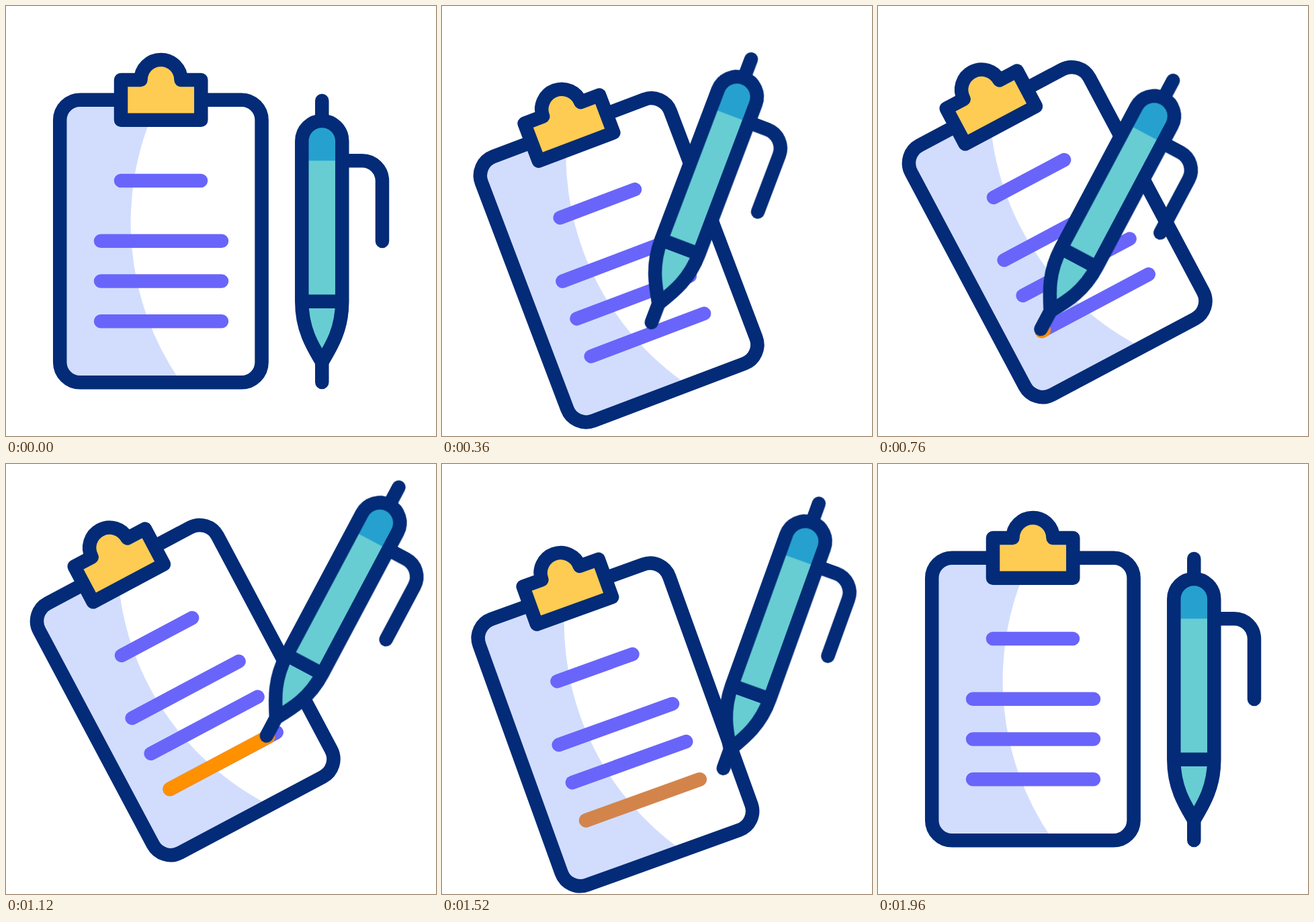
Recreate the animation shown at these times as an HTML page without scripts. Size 640x640 px, loop 2000 ms.

```html
<!DOCTYPE html>
<html lang="en">
<head>
<meta charset="utf-8">
<title>Clipboard and pen</title>
<style>
  html, body { margin: 0; width: 100%; height: 100%; overflow: hidden; background: #fff; }
  svg { display: block; width: 100%; height: 100%; }

  .ink { fill: none; stroke: #032b77; stroke-width: 20.5; stroke-linecap: round; stroke-linejoin: round; }
  .text { fill: none; stroke: #6965fa; stroke-width: 20.5; stroke-linecap: round; }
  .mark { fill: none; stroke: #ff9100; stroke-width: 21; stroke-linecap: round; stroke-dasharray: 180 400; }

  .board, .pen, .mark {
    animation-duration: 2s;
    animation-iteration-count: infinite;
    animation-timing-function: cubic-bezier(.5, 0, .5, 1);
  }
  .board { transform-origin: 230.5px 350px; animation-name: board-turn, board-move; }
  .pen { transform-origin: 470.5px 230px; animation-name: pen-turn, pen-move; }
  .mark { animation-name: write, fade; }

  @keyframes board-turn {
    0%, 2%, 98%, 100% { rotate: 0deg; }
    27.5%, 62% { rotate: -28deg; }
  }
  @keyframes pen-turn {
    0%, 2%, 98%, 100% { rotate: 0deg; }
    27.5%, 62% { rotate: 28deg; }
  }

  /* dips in an arc on the way in and on the way back */
  @keyframes board-move {
    0%, 98%, 100% { translate: 0 0; }
    2% { translate: 0 0; animation-timing-function: cubic-bezier(.5, 0, .8, .66); }
    10% { translate: 10px 31px; animation-timing-function: linear; }
    13.5% { translate: 19px 39.5px; animation-timing-function: linear; }
    16% { translate: 27px 38.5px; animation-timing-function: linear; }
    18% { translate: 32.7px 28.5px; animation-timing-function: cubic-bezier(.25, .33, .5, 1); }
    27.5% { translate: 36.3px -13.5px; }
    62% { translate: 36.3px -13.5px; animation-timing-function: cubic-bezier(.5, 0, .8, .66); }
    74% { translate: 32.8px 27.5px; animation-timing-function: linear; }
    76% { translate: 27.7px 37.9px; animation-timing-function: cubic-bezier(.3, .5, .65, .9); }
    80% { translate: 19px 39px; animation-timing-function: cubic-bezier(.4, .2, .7, .6); }
    84% { translate: 9.2px 30.6px; animation-timing-function: cubic-bezier(.2, .33, .5, 1); }
  }

  @keyframes pen-move {
    0%, 98%, 100% { translate: 0 0; }
    2% { translate: 0 0; animation-timing-function: cubic-bezier(.5, 0, .65, .9); }
    14% { translate: -31px -75px; animation-timing-function: cubic-bezier(.4, .3, .7, .6); }
    18% { translate: -41.5px -67.7px; animation-timing-function: cubic-bezier(.33, .4, .6, 1); }
    30% { translate: -79px -35px; animation-timing-function: ease-in-out; }
    35% { translate: -76px -38.8px; }
    62% { translate: 85.3px -123.5px; }
  }

  @keyframes write {
    0%, 35% { stroke-dashoffset: 180; }
    62%, 100% { stroke-dashoffset: 0; }
  }
  @keyframes fade {
    0% { opacity: 0; animation-timing-function: step-end; }
    35%, 62% { opacity: 1; }
    98%, 100% { opacity: 0; }
  }
</style>
</head>
<body>
<svg viewBox="0 0 640 640">
  <g class="board">
    <rect x="80.2" y="139.8" width="300.4" height="420.4" rx="30" fill="#fff"/>
    <path d="M110 140H223V150A415 415 0 0 0 260.5 560H110A30 30 0 0 1 80 530V170A30 30 0 0 1 110 140Z" fill="#d2ddfd"/>
    <rect class="ink" x="80.2" y="139.8" width="300.4" height="420.4" rx="30"/>
    <path class="ink" d="M171 110H200.5a30 30 0 0 1 60 0H290.3V169.8H171Z" style="fill:#fecc52"/>
    <path class="text" d="M171 260H290M141 349.7H321M141 409.4H321M141 469.3H321"/>
    <path class="mark" d="M141 469.3H321"/>
  </g>
  <g class="pen">
    <path class="ink" d="M470.3 141V171M470.3 530V560M500.3 230.3H530a30 30 0 0 1 30 30V350"/>
    <path d="M440.3 201a30 30 0 0 1 60 0V440c0 40-15 65-30 90c-15-25-30-50-30-90Z" fill="#67cdd3"/>
    <path d="M440.3 230.3V201a30 30 0 0 1 60 0V230.3Z" fill="#26a1cf"/>
    <path class="ink" d="M440.3 201a30 30 0 0 1 60 0V440c0 40-15 65-30 90c-15-25-30-50-30-90ZM440.3 439.7H500.3"/>
  </g>
</svg>
</body>
</html>
```
